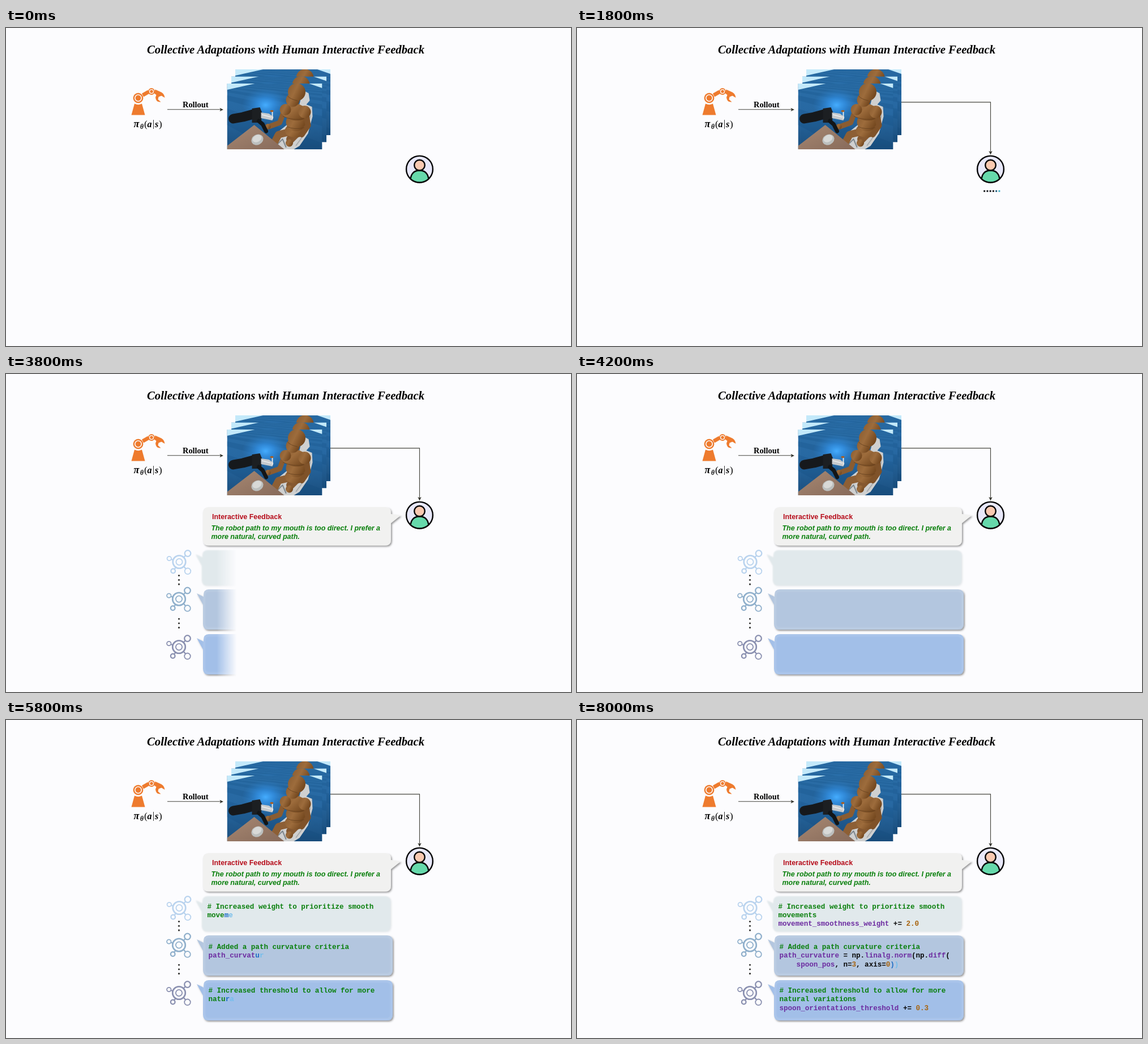
Recreate the animation shown at these times as an HTML page. Size 998x561 px, loop 9000 ms.

```html
<!DOCTYPE html>
<html lang="en">
<head>
<meta charset="utf-8">
<title>Collective Adaptations</title>
<style>
  html, body { margin: 0; height: 100%; overflow: hidden; background: #fcfcfe; }
  svg { display: block; width: 100%; height: 100%; }
  text { white-space: pre; }
  .serif { font-family: "Liberation Serif", "Times New Roman", serif; font-weight: bold; }
  .sans { font: bold 12.45px "Liberation Sans", Arial, sans-serif; }
  .code { font: bold 12.55px "Liberation Mono", "Courier New", monospace; }
  .it { font-style: italic; }
  .line { fill: none; stroke: #45453d; stroke-width: 1.15; }
  .limb { fill: none; stroke-linecap: round; stroke-linejoin: round; }
</style>
</head>
<body>
<svg viewBox="0 0 998 561">
  <defs>
    <linearGradient id="floor" x2="0" y2="1">
      <stop offset="0" stop-color="#2a6da6"/><stop offset=".45" stop-color="#2768a2"/><stop offset="1" stop-color="#1b4f7e"/>
    </linearGradient>
    <radialGradient id="glow">
      <stop offset="0" stop-color="#45adff"/><stop offset=".4" stop-color="#3291e6" stop-opacity=".75"/><stop offset="1" stop-color="#2b7cc4" stop-opacity="0"/>
    </radialGradient>
    <linearGradient id="skin" x2="1" y2=".5">
      <stop offset="0" stop-color="#8a5c30"/><stop offset=".5" stop-color="#9d6c3c"/><stop offset="1" stop-color="#74481f"/>
    </linearGradient>
    <linearGradient id="wood" x2="1" y2="1">
      <stop offset="0" stop-color="#a78872"/><stop offset="1" stop-color="#876a5a"/>
    </linearGradient>
    <clipPath id="crop"><rect width="168" height="116"/></clipPath>
    <filter id="drop" x="-10%" y="-20%" width="120%" height="150%">
      <feDropShadow dx="1.8" dy="2" stdDeviation="1.5" flood-color="#333" flood-opacity=".5"/>
    </filter>
    <filter id="soft" x="-10%" y="-20%" width="120%" height="150%">
      <feGaussianBlur stdDeviation=".9"/>
      <feDropShadow dx="1" dy="1" stdDeviation="1.3" flood-color="#567" flood-opacity=".2"/>
    </filter>
    <filter id="blur"><feGaussianBlur stdDeviation="1.4"/></filter>

    <g id="shot" clip-path="url(#crop)">
      <rect width="168" height="116" fill="url(#floor)"/>
      <path id="tiles" fill="#0c3f70" opacity=".16"/>
      <ellipse cx="68" cy="38" rx="42" ry="30" fill="url(#glow)"/>
      <path d="M0 0H49L0 11ZM145 0H168V8Z" fill="#c3e9fa"/>
      <!-- chair -->
      <path d="M134 12L144 17 146 30 140 37 150 41 151 58 143 88 128 110 118 116H90L80 105 84 90 122 60Z" fill="#cfd0d0"/>
      <path d="M143 43L147 58 136 90 122 109" class="limb" stroke="#a9abac" stroke-width="2"/>
      <path d="M88 108L98 98 104 112" class="limb" stroke="#7f878d" stroke-width="2"/>
      <!-- seated figure -->
      <g fill="url(#skin)">
        <path d="M122 88L112 98" class="limb" stroke="#855830" stroke-width="15"/>
        <path d="M112 85L91 90 83 105" class="limb" stroke="#8d5f35" stroke-width="13"/>
        <path d="M100 50L93 69 74 76" class="limb" stroke="#8a5c31" stroke-width="9"/>
        <ellipse cx="121" cy="83" rx="19" ry="12"/>
        <ellipse cx="122" cy="68" rx="18" ry="16"/>
        <ellipse cx="119" cy="50" rx="24" ry="15" transform="rotate(10 119 50)"/>
        <circle cx="103" cy="46" r="10"/>
        <path d="M140 56L143 74 132 90" class="limb" stroke="#7f5229" stroke-width="10"/>
        <circle cx="137" cy="50" r="11"/>
        <ellipse cx="116" cy="29" rx="12" ry="12"/>
        <ellipse cx="123" cy="15" rx="15.500" ry="15.500"/>
        <circle cx="110" cy="105" r="6.500"/>
        <circle cx="72" cy="76" r="5"/>
      </g>
      <path d="M107 22Q112 28 124 30M99 58Q117 66 136 62M106 76Q118 82 136 78" class="limb" stroke="#65401f" stroke-width="1" opacity=".8"/>
      <!-- robot arm -->
      <path d="M11 62L28 59 50 53" class="limb" stroke="#16191c" stroke-width="17"/>
      <path d="M44 44L58 42 62 52 60 69 44 69Z" fill="#1c1f22"/>
      <path d="M56 66L63 72 69 84" class="limb" stroke="#121517" stroke-width="7"/>
      <path d="M60 51L74 53 82 59 80 65 60 61Z" fill="#c6cacd"/>
      <path d="M62 55L77 59M80 50V62" class="limb" stroke="#eceded" stroke-width="1.8"/>
      <ellipse cx="79" cy="48.500" rx="3" ry="1.7" fill="#a85e24"/>
      <!-- table and bowl -->
      <path d="M0 110L48 73 101 116H0Z" fill="url(#wood)"/>
      <ellipse cx="53.500" cy="99" rx="11" ry="9" transform="rotate(-28 53.500 99)" fill="#bcbfbe"/>
      <ellipse cx="53" cy="97" rx="8.500" ry="6" transform="rotate(-28 53 97)" fill="#d8d9d7"/>
    </g>

    <g id="hub" fill="none" stroke-width="2.3">
      <path d="M8.500 -8.500L11.500 -11.500M-11 -3.500L-14 -4.500M-6 10L-9 13M8.500 8.500L11.500 12"/>
      <circle r="11.300" stroke-width="2.6"/><circle r="5.600" stroke-width="1.8"/>
      <circle cx="15" cy="-15" r="5.300"/><circle cx="-17.700" cy="-6" r="3.700" stroke-width="1.8"/>
      <circle cx="-10.800" cy="16" r="3.800"/><circle cx="15" cy="16.300" r="5.300" stroke-width="1.8"/>
    </g>
  </defs>

  <rect width="998" height="561" fill="#fcfcfe"/>
  <text class="serif it" x="249" y="45" font-size="20.77">Collective Adaptations with Human Interactive Feedback</text>

  <!-- robot icon -->
  <g fill="#ee7b2e">
    <path d="M227 133.500Q233.500 137 240 133.500L245.500 153.500H221.500Z"/>
    <path d="M240 115.500L250.500 109.500 253.500 115.500 243 121.500Z"/>
    <circle cx="233.500" cy="123.500" r="8.900"/>
    <circle cx="233.500" cy="123.500" r="5.700" fill="none" stroke="#fcfcfe" stroke-width="1.6"/>
    <circle cx="257" cy="112" r="5.900"/>
    <circle cx="257" cy="112" r="3.400" fill="none" stroke="#fcfcfe" stroke-width="1.3"/>
    <path d="M263.500 108.500L271.500 112Q279.500 114.500 280.500 123L274.500 119.500 269.500 121.500 268.500 126 273.500 130.500Q265 131.500 264 122.500L265.500 118 261.500 115Z"/>
  </g>
  <g class="serif it" font-size="16">
    <text x="225.500" y="174.500" font-size="18">π</text>
    <text x="237" y="177.500" font-size="11.5">θ</text>
    <text x="244" y="174.500" font-style="normal" font-weight="400" font-size="17">(</text>
    <text x="249.500" y="174.500">a</text>
    <text x="259" y="174" font-style="normal" font-weight="400">|</text>
    <text x="263" y="174.500">s</text>
    <text x="270" y="174.500" font-style="normal" font-weight="400" font-size="17">)</text>
  </g>
  <text class="serif" x="312" y="140" font-size="14.4">Rollout</text>
  <path class="line" d="M285 143.700H381"/>
  <path d="M384 144L377.500 141 379 144 377.500 147Z" fill="#35352e"/>

  <use href="#shot" x="405" y="73"/>
  <use href="#shot" x="398" y="85.500"/>
  <use href="#shot" x="390.500" y="98"/>

  <g id="route">
    <path class="line" d="M573 130.800H730.500V220"/>
    <path d="M730.500 223.500L727.300 217 730.500 218.500 733.700 217Z" fill="#35352e"/>
  </g>

  <!-- user icon -->
  <g stroke="#050505" stroke-width="2.4">
    <circle cx="730.500" cy="249" r="23.400" fill="#e8e8fa"/>
    <path d="M714.500 266.200C716 256 722 251.300 730.500 251.300S745 256 746.500 266.200A23.400 23.400 0 0 1 714.500 266.200Z" fill="#66d9ab"/>
    <circle cx="730.500" cy="242" r="9.300" fill="#f9c9b1"/>
  </g>
  <g id="dots"></g>

  <g id="bubble">
    <path filter="url(#drop)" fill="#f1f1f0" d="M358 235H670Q680 235 680 245V247L697 249.500 680 263V292.500Q680 302.500 670 302.500H358Q348 302.500 348 292.500V245Q348 235 358 235Z"/>
    <text class="sans" x="364" y="256.300" fill="#b60d1b">Interactive Feedback</text>
    <g class="sans it" fill="#087f0b">
      <text x="362.500" y="275.500">The robot path to my mouth is too direct. I prefer a</text>
      <text x="362.500" y="290.500">more natural, curved path.</text>
    </g>
  </g>
  <g id="agents"></g>
  <g id="code"></g>
</svg>

<script>
const NS = 'http://www.w3.org/2000/svg';
const $ = id => document.getElementById(id);

function add(parent, tag, attrs = {}) {
  const el = document.createElementNS(NS, tag);
  for (const k in attrs) el.setAttribute(k, attrs[k]);
  return parent.appendChild(el);
}

// Checkered floor in perspective
function floorPath() {
  const at = (u, v) => {
    const s = 1 / (u + v + 4);
    return (70 + (u - v) * 230 * s).toFixed(1) + ' ' + (500 * s - 14).toFixed(1);
  };
  let d = '';
  for (let u = -8; u < 20; u++)
    for (let v = -8; v < 20; v++)
      if (u + v >= -2 && u % 2 === 0)
        d += `M${at(u, v)}L${at(u + 1, v)} ${at(u + 1, v + 1)} ${at(u, v + 1)}Z`;
  return d;
}
$('tiles').setAttribute('d', floorPath());

// Soft-edged wipe along x; the edge runs from one place to the other
const EDGE = 35;
function wipe(id, from, to, start, end) {
  const defs = document.querySelector('defs');
  const grad = add(defs, 'linearGradient', { id: id + 'Fade', gradientUnits: 'userSpaceOnUse', y1: 0, y2: 0 });
  add(grad, 'stop', { offset: 0, 'stop-color': '#fff' });
  add(grad, 'stop', { offset: 1, 'stop-color': '#000' });
  const box = { x: 0, y: 0, width: 998, height: 561 };
  const mask = add(defs, 'mask', { id: id + 'Mask', maskUnits: 'userSpaceOnUse', ...box });
  add(mask, 'rect', { ...box, fill: `url(#${id}Fade)` });
  const group = $(id);
  return t => {
    const p = (t - start) / (end - start);
    const x = from + (to - from) * p;
    group.style.display = p <= 0 ? 'none' : '';
    if (p >= 1) return group.removeAttribute('mask');
    group.setAttribute('mask', `url(#${id}Mask)`);
    grad.setAttribute('x1', x - EDGE * Math.sign(to - from));
    grad.setAttribute('x2', x);
  };
}

const GREEN = '#087f0b', PURPLE = '#6c2ba0', BLACK = '#080808', BROWN = '#a8640f';
const FRESH = ['#72bdec', '#1c6cc6'];

const panels = [
  { x: 346, y: 311, w: 333.5, h: 62, fill: '#e1e9ec', filter: 'soft', hub: [306, 331.5], ring: '#b9d3ee', tx: 355.5, ty: 332.5,
    keys: [[4200, 0], [5000, 24], [6800, 71], [7300, 84]],
    lines: [
      [[GREEN, '# Increased weight to prioritize smooth']],
      [[GREEN, 'movements']],
      [[PURPLE, 'movement_smoothness_weight'], [BLACK, ' += '], [BROWN, '2.0']]] },
  { x: 348, y: 380, w: 335, h: 71, fill: '#b3c6df', filter: 'drop', hub: [305.5, 397], ring: '#8fafcb', tx: 357.5, ty: 404.3,
    keys: [[4200, 0], [5000, 24], [6800, 73], [8000, 97]],
    lines: [
      [[GREEN, '# Added a path curvature criteria']],
      [[PURPLE, 'path_curvature'], [BLACK, ' = np.'], [PURPLE, 'linalg.norm'], [BLACK, '(np.'], [PURPLE, 'diff'], [BLACK, '(']],
      [[PURPLE, 'spoon_pos'], [BLACK, ', n='], [BROWN, '3'], [BLACK, ', axis='], [BROWN, '0'], [BLACK, '))']]] },
  { x: 348, y: 459, w: 335, h: 71, fill: '#a2bfe8', filter: 'drop', hub: [305.5, 481.5], ring: '#8a90b0', tx: 357.5, ty: 481.3,
    keys: [[4200, 0], [5000, 23], [6800, 73], [7600, 95]],
    lines: [
      [[GREEN, '# Increased threshold to allow for more']],
      [[GREEN, 'natural variations']],
      [[PURPLE, 'spoon_orientations_threshold'], [BLACK, ' += '], [BROWN, '0.3']]] }
];

function drawPanel(p, row) {
  const { x, y, w, h } = p, g = $('agents');
  const d = `M${x + 10} ${y}h${w - 20}q10 0 10 10v${h - 20}q0 10 -10 10h${20 - w}q-10 0 -10 -10V${y + 27}L${x - 11} ${y + 7}L${x + 1} ${y + 13}Q${x} ${y} ${x + 10} ${y}Z`;
  add(g, 'path', { d, fill: p.fill, filter: `url(#${p.filter})` });
  if (row) add(g, 'rect', { x: x + 2, y: y + 2, width: w - 4, height: h - 4, rx: 8, fill: 'none', stroke: '#fff', 'stroke-opacity': .2, 'stroke-width': 2, filter: 'url(#blur)' });
  add(g, 'use', { href: '#hub', x: p.hub[0], y: p.hub[1], stroke: p.ring });
  if (row < 2) for (let i = 0; i < 3; i++)
    add(g, 'circle', { cx: 305.5, cy: [355.5, 432][row] + i * 7.7, r: 1.55, fill: '#30302e' });

  p.chars = [];
  p.lines.forEach((line, i) => {
    const indent = row === 1 && i === 2 ? 30.1 : 0;
    const text = add($('code'), 'text', { class: 'code', x: p.tx + indent, y: p.ty + i * 15.1 });
    for (const [color, str] of line)
      for (const ch of str) {
        const el = add(text, 'tspan', { fill: 'none' });
        el.textContent = ch;
        p.chars.push({ el, color });
      }
  });
}
panels.forEach(drawPanel);

const dots = Array.from({ length: 6 }, (_, i) => ({
  el: add($('dots'), 'rect', { x: 718.2 + i * 5.25, y: 286.3, width: 2.9, height: 2.9 }),
  color: '#0d1218'
}));

function lerpKeys(keys, t) {
  if (t <= keys[0][0]) return keys[0][1];
  for (let i = 1; i < keys.length; i++) {
    const [a, m] = keys[i - 1], [b, n] = keys[i];
    if (t <= b) return m + (n - m) * (t - a) / (b - a);
  }
  return keys[keys.length - 1][1];
}

// The newest characters arrive light and settle into their colour
function type(chars, count, fresh = FRESH) {
  chars.forEach(({ el, color }, i) => {
    const age = count - 1 - i;
    el.setAttribute('fill', age < 0 ? 'none' : fresh[age] || color);
  });
}

function dotCount(t) {
  if (t >= 3200) return 0;
  if (t >= 2200) return Math.min(6, 2 * (t - 2000) / 200);
  return Math.max(0, Math.min(6, (t - 600) / 200));
}

const wipes = [
  wipe('route', 573, 775, 100, 600),
  wipe('bubble', 705, 305, 3100, 3600),
  wipe('agents', 284, 725, 3660, 4160)
];

const LOOP = 9000, STEP = 200;
let last = -1;
function draw(now) {
  const t = Math.floor(now % LOOP / STEP) * STEP;
  if (t !== last) {
    last = t;
    wipes.forEach(w => w(t));
    type(dots, dotCount(t), ['#43aec6', '#1d5874']);
    panels.forEach(p => type(p.chars, Math.round(lerpKeys(p.keys, t))));
  }
}

const begin = performance.now();
function frame() {
  draw(performance.now() - begin);
  requestAnimationFrame(frame);
}
draw(0);
requestAnimationFrame(frame);
</script>
</body>
</html>
```
